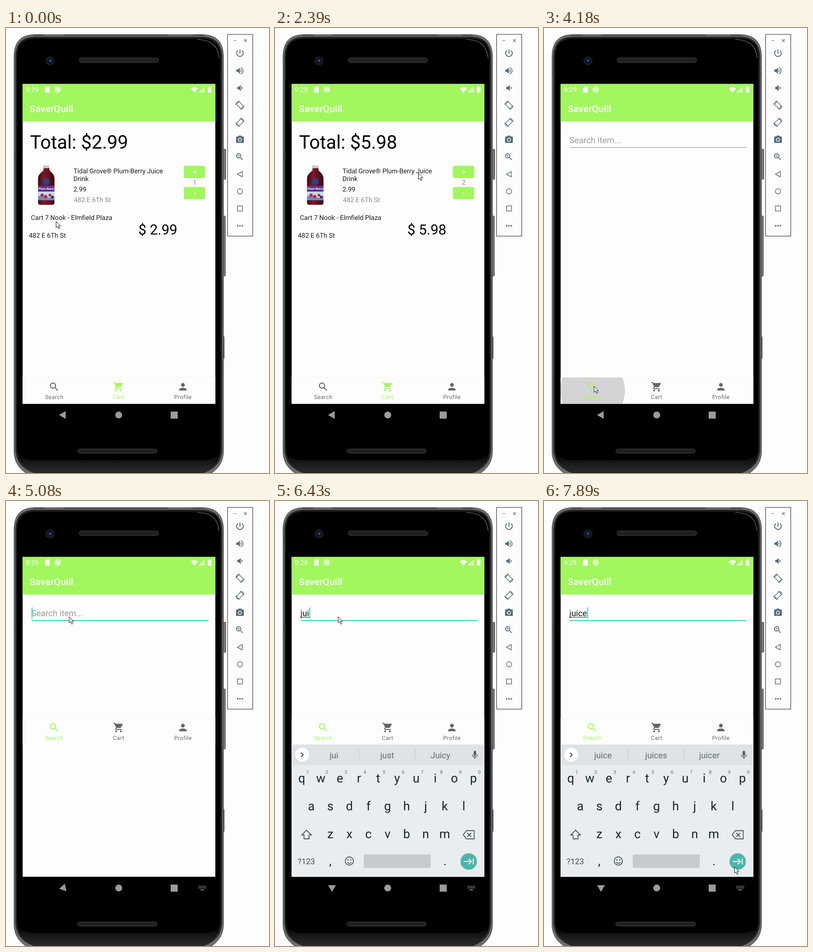
Animation of 575 by 974 pixels, one loop 8 s. Source, as an HTML page:

```html
<!DOCTYPE html>
<html lang="en">
<head>
<meta charset="utf-8">
<title>Cart and search demo</title>
<style>
html, body { margin: 0; width: 100%; height: 100%; overflow: hidden; background: #fdfdfd; }
svg { display: block; width: 575px; height: 974px; font-family: Roboto, "Open Sans", sans-serif; }
text { text-rendering: geometricPrecision; white-space: pre; }
.body { font-size: 14.4px; fill: #1b1b1b; }
.mid { text-anchor: middle; }
.btn { font-size: 14.4px; font-weight: 500; fill: #fff; text-anchor: middle; }
.nav { font-size: 12.3px; letter-spacing: .4px; text-anchor: middle; }
.tab { fill: #666; }
.tab.on { fill: #a2f75e; }
.key { font-size: 27px; fill: #14272e; text-anchor: middle; }
.sup { font-size: 10.5px; font-weight: 500; fill: #78838a; text-anchor: middle; }
.hint { font-size: 18.5px; fill: #5f6a70; text-anchor: middle; }
.line { fill: none; stroke: #546e7a; stroke-width: 1.7; }
</style>
</head>
<body>
<svg viewBox="0 0 575 974" xmlns="http://www.w3.org/2000/svg">
<defs>
  <linearGradient id="chin" x2="0" y2="1">
    <stop offset="0" stop-color="#000"/><stop offset="1" stop-color="#2b2c2e"/>
  </linearGradient>
  <linearGradient id="shade" x2="0" y2="1">
    <stop offset="0" stop-color="#cfe3c0"/><stop offset="1" stop-color="#fdfdfd"/>
  </linearGradient>
  <linearGradient id="juice">
    <stop offset="0" stop-color="#3c0a14"/><stop offset=".35" stop-color="#7c1a2c"/>
    <stop offset=".7" stop-color="#5c1020"/><stop offset="1" stop-color="#34080f"/>
  </linearGradient>
  <radialGradient id="lens">
    <stop offset="0" stop-color="#2c3a80"/><stop offset=".4" stop-color="#161d4a"/>
    <stop offset=".75" stop-color="#0a0c1c"/><stop offset="1" stop-color="#1c1e22"/>
  </radialGradient>
  <clipPath id="screen"><rect x="36.4" y="122.6" width="421.2" height="700"/></clipPath>
  <clipPath id="bar"><rect x="36" y="765" width="422" height="58"/></clipPath>
  <clipPath id="plus"><rect x="389" y="301.5" width="46.5" height="26.5" rx="3.5"/></clipPath>
  <path id="search" d="M15.5 14h-.79l-.28-.27C15.41 12.59 16 11.11 16 9.5 16 5.91 13.09 3 9.5 3S3 5.91 3 9.5 5.91 16 9.5 16c1.61 0 3.09-.59 4.23-1.57l.27.28v.79l5 4.99L20.49 19l-4.99-5zm-6 0C7.01 14 5 11.99 5 9.5S7.01 5 9.5 5 14 7.01 14 9.5 11.99 14 9.5 14z"/>
  <path id="cart" d="M7 18c-1.1 0-2 .9-2 2s.9 2 2 2 2-.9 2-2-.9-2-2-2zM1 2v2h2l3.6 7.59-1.35 2.45c-.16.28-.25.61-.25.96 0 1.1.9 2 2 2h12v-2H7.42c-.14 0-.25-.11-.25-.25l.03-.12.9-1.63h7.45c.75 0 1.41-.41 1.75-1.03l3.58-6.49c.08-.14.12-.31.12-.48 0-.55-.45-1-1-1H5.21l-.94-2H1zm16 16c-1.1 0-2 .9-2 2s.9 2 2 2 2-.9 2-2-.9-2-2-2z"/>
  <path id="person" d="M12 12c2.21 0 4-1.79 4-4s-1.79-4-4-4-4 1.79-4 4 1.79 4 4 4zm0 2c-2.67 0-8 1.34-8 4v2h16v-2c0-2.66-5.33-4-8-4z"/>
  <path id="mic" d="M12 14c1.66 0 3-1.34 3-3V5c0-1.66-1.34-3-3-3S9 3.34 9 5v6c0 1.66 1.34 3 3 3zm5.3-3c0 3-2.54 5.1-5.3 5.1S6.7 14 6.7 11H5c0 3.41 2.72 6.23 6 6.72V21h2v-3.28c3.28-.48 6-3.3 6-6.72h-1.7z"/>
  <path id="speaker" d="M3 9v6h4l5 5V4L7 9zM14 8v8c1.5-.7 2.5-2.2 2.5-4S15.5 8.7 14 8z"/>
  <g id="turn" class="line">
    <rect x="-8.5" y="-5" width="17" height="10" rx="1.5" transform="rotate(45)"/>
    <path d="M-1-11A11 11 0 0 0-11-1M1 11A11 11 0 0 0 11 1"/>
  </g>
</defs>

<rect width="575" height="974" fill="#fdfdfd"/>

<!-- phone -->
<g fill="#7d7e80" stroke="#2c2d2e">
  <rect x="473" y="265.500" width="7.500" height="65.500" rx="1.500"/>
  <rect x="473" y="411.500" width="6.500" height="131.500" rx="1.500"/>
  <rect x="472" y="675.500" width="5" height="48" rx="1"/>
</g>
<path d="M17.500 64C17.500 30 32 14.500 64 14.500H428C460 14.500 475.500 30 475.500 64V925C475.500 950 465 966 440 980H53C28 966 17.500 950 17.500 925Z" fill="#6b6c6e" stroke="#3c3d3f"/>
<path d="M60 15.500H84M126 15.500H354M408 15.500H432" stroke="#3a3b3d" stroke-width="2"/>
<path d="M20.500 66C20.500 34 34 19 66 19H426C458 19 472.500 34 472.500 66V918C472.500 948 460 963 432 974H61C33 963 20.500 948 20.500 918Z" fill="#232425"/>
<path d="M24 66C24 36 36 23 66 23H426C457 23 469 36 469 66V915C469 944 457 960 430 968H63C36 960 24 944 24 915Z" fill="#000"/>
<path d="M27 928Q34 946 62 946H431Q459 946 466 928Q462 960 430 972H63Q31 960 27 928Z" fill="url(#chin)"/>
<path d="M418 25C449 26 463 38 466 66" fill="none" stroke="#707274" stroke-width="1.600" opacity=".75"/>
<path d="M17 87.500H24M17 97.500H24M17 277.500H24M17 286.500H24M469 87.500H476M469 97.500H476" stroke="#3a3b3d"/>
<circle cx="96" cy="72" r="10" fill="#1a1b1e"/>
<circle cx="96" cy="72" r="7" fill="url(#lens)"/>
<circle cx="97" cy="71" r="1.200" fill="#8794d8"/>
<g fill="#1f2021" stroke="#434445">
  <rect x="160" y="65.500" width="173.500" height="10" rx="4.500"/>
  <rect x="157" y="921.500" width="173.500" height="9" rx="4.500"/>
</g>

<!-- screen -->
<g clip-path="url(#screen)">
  <rect x="36" y="122" width="422" height="701" fill="#fdfdfd"/>
  <rect x="36" y="204" width="422" height="2.500" fill="url(#shade)"/>
  <rect x="36" y="122" width="422" height="82.300" fill="#a2f75e"/>
  <g fill="#fff">
    <text x="43.500" y="140" font-size="14.400">9:29</text>
    <path d="M88.500 128H95.500V141.500H85.500V131.500Z"/>
    <path d="M404.500 132.500Q412 125.500 419.500 132.500L412 141.500Z"/>
    <path d="M434 128.500V141H421.500ZM432.500 132L426 139.500H430V136H432.500Z" fill-rule="evenodd"/>
    <path d="M443.500 127.500H446.500V129H449V141.500H441.500V129H443.500Z"/>
    <text x="52" y="183.500" font-size="20.500" font-weight="500" letter-spacing=".26">SaverQuill</text>
  </g>
  <g fill="none" stroke="#fff" stroke-width="1.500">
    <circle cx="113" cy="134.700" r="6"/><circle cx="113.500" cy="134.700" r="2.700"/>
    <path d="M108.500 131L117 139"/>
  </g>

  <g id="cartPage">
    <text id="total" x="52.500" y="264.400" font-size="41"></text>
    <g id="bottle">
      <path d="M82 305H95V311C98 316 106 319 106 330V382Q106 387 101 387H75Q70 387 70 382V330C70 319 79 316 82 311Z" fill="url(#juice)"/>
      <rect x="81" y="301" width="14" height="6" rx="1.500" fill="#c9c5cc"/>
      <circle cx="88" cy="336" r="7.500" fill="#2b4383"/>
      <rect x="70" y="345" width="36" height="13" fill="#5c318c"/>
      <rect x="70" y="358" width="36" height="18" fill="#c8d4ea"/>
      <path d="M70 369Q79 363 88 369T106 367V377H70Z" fill="#6d8cc4"/>
      <g fill="#b9283c"><circle cx="79" cy="366" r="3.500"/><circle cx="87" cy="369" r="3.500"/><circle cx="96" cy="366" r="3"/></g>
      <circle cx="101" cy="370" r="3" fill="#46285f"/>
      <text x="88" y="354" class="mid" font-size="6.600" font-weight="700" fill="#fff">Plum-Berry</text>
    </g>
    <g class="body">
      <text x="147.500" y="318">Tidal Grove® Plum-Berry Juice</text>
      <text x="147.500" y="334.500">Drink</text>
      <text x="147.500" y="357.500">2.99</text>
      <text x="148.500" y="381" fill="#8a8a8a">482 E 6Th St</text>
      <text x="54.500" y="420">Cart 7 Nook - Elmfield Plaza</text>
      <text x="50" y="458.500">482 E 6Th St</text>
    </g>
    <text id="sum" x="289.500" y="451.500" font-size="30.800"></text>
    <g fill="#d4e9c5">
      <rect x="389" y="302.500" width="46.500" height="26.500" rx="3.500"/>
      <rect x="389" y="349" width="46.500" height="26.500" rx="3.500"/>
    </g>
    <g fill="#a2f75e">
      <rect x="389" y="301.500" width="46.500" height="26.500" rx="3.500"/>
      <rect x="389" y="348" width="46.500" height="26.500" rx="3.500"/>
    </g>
    <circle id="press" cx="410" cy="318" r="20" fill="#fff" opacity=".35" clip-path="url(#plus)"/>
    <text x="412.500" y="320" class="btn">+</text>
    <text x="412.500" y="366" class="btn">-</text>
    <text id="count" x="412.500" y="342.500" class="mid" font-size="14.400" fill="#808080"></text>
  </g>

  <g id="searchPage">
    <text id="holder" x="55.500" y="252" font-size="18.500" fill="#9b9b9b">Search item...</text>
    <text id="typed" x="55.500" y="252" font-size="18.500" fill="#1b1b1b"></text>
    <rect id="compose" x="56" y="254" height="1" fill="#1b1b1b"/>
    <rect id="rule" x="56" width="387"/>
    <rect id="caret" y="233" width="1.800" height="24" fill="#1fd0c0"/>
  </g>

  <g id="tabs">
    <rect x="36" y="765" width="422" height="58" fill="#fdfdfd"/>
    <rect x="36" y="764" width="422" height="1" fill="#f6f6f6"/>
    <circle id="ripple" cx="106" cy="794" r="71" clip-path="url(#bar)"/>
  </g>

  <g id="board">
    <rect x="36" y="533" width="422" height="290" fill="#e9edf0"/>
    <rect x="36" y="533" width="422" height="45" fill="#dfe3e6"/>
    <circle cx="59.500" cy="556.500" r="15.700" fill="#c9cdd0"/>
    <circle cx="59.500" cy="555.700" r="15.500" fill="#fff"/>
    <path d="M57 551L61.500 555.500L57 560" fill="none" stroke="#37474f" stroke-width="2"/>
    <path d="M183.500 543.500V567M306.500 543.500V567" stroke="#c3c9cc"/>
    <use href="#mic" transform="translate(426 545) scale(.92)" fill="#4c5a61"/>
    <g id="keys"></g>
    <g fill="none" stroke="#46545b" stroke-width="1.800">
      <path d="M69 720.500L79.500 731H74.500V739.500H63.500V731H58.500Z"/>
      <path d="M418.500 721.500H435.500V739.500H418.500L411.500 730.500ZM420.500 726.500L429 735M429 726.500L420.500 735"/>
      <circle cx="162.500" cy="788" r="9"/><path d="M157.500 790.500Q162.500 796 167.500 790.500"/>
    </g>
    <g fill="#46545b"><circle cx="159.300" cy="785.500" r="1.400"/><circle cx="165.700" cy="785.500" r="1.400"/></g>
    <rect x="194" y="773.500" width="146.500" height="29.500" rx="2.500" fill="#c7cbce"/>
    <circle cx="423.500" cy="789" r="18" fill="#4cb5ab"/>
    <path d="M413 789H429M423.500 783L429.500 789L423.500 795M433.500 782.500V795.500" fill="none" stroke="#fff" stroke-width="2"/>
  </g>
</g>

<!-- system bar -->
<g fill="#9b9b9b">
  <path id="back" d="M116 847L130.500 838.500V855.500Z"/>
  <circle cx="246.500" cy="847" r="7.600"/>
  <rect x="360" y="839.500" width="15.500" height="15.500"/>
  <g id="kbIcon"></g>
</g>

<!-- emulator toolbar -->
<rect x="484.500" y="14" width="55" height="441.500" fill="#fdfdfd" stroke="#1a1a1a"/>
<path d="M497.500 27.500H503.500M520.500 24.500L526.500 30.500M526.500 24.500L520.500 30.500" class="line" style="stroke-width:1.200"/>
<path d="M511.500 47V56.500M507 49.200A7.300 7.300 0 1 0 516 49.200" class="line" style="stroke-width:2"/>
<g fill="#546e7a">
  <use href="#speaker" transform="translate(501 83) scale(.87)"/>
  <path d="M513.200 86.700A7 7 0 0 1 513.200 100.200" class="line"/>
  <use href="#speaker" transform="translate(503 121) scale(.86)"/>
  <path d="M509 235.500H514L515.800 237.500H518.500Q520 237.500 520 239V250Q520 251.500 518.500 251.500H504.500Q503 251.500 503 250V239Q503 237.500 504.500 237.500H507.200Z"/>
  <circle cx="511.500" cy="244.500" r="3.500" fill="none" stroke="#fdfdfd" stroke-width="1.500"/>
  <use href="#search" transform="translate(500.500 271.500) scale(.87)"/>
  <path d="M506 279.800H511.500M508.750 277V282.500" stroke="#546e7a"/>
  <circle cx="506.500" cy="433" r="1.800"/><circle cx="511.500" cy="433" r="1.800"/><circle cx="516.500" cy="433" r="1.800"/>
</g>
<use href="#turn" transform="translate(511.500 169) scale(-.82 .82) rotate(90)"/>
<use href="#turn" transform="translate(511.500 206.500) scale(.82) rotate(90)"/>
<g class="line" style="stroke-width:1.500">
  <path d="M506 320L516.500 314V326Z"/><circle cx="511.500" cy="357.500" r="5.700"/>
  <rect x="506" y="389.500" width="11" height="11"/>
</g>

<path id="cursor" d="M0 0V13.500L3.200 10.600L5.600 16L7.900 15L5.500 9.800H9.800Z" fill="#fff" stroke="#111" stroke-linejoin="round"/>
</svg>

<script>
const $ = id => document.getElementById(id);
const LOOP = 8000;
const ticks = [0, 150, 290, 430, 570, 710, 850, 990, 1700,
  1970, 2110, 2250, 2390, 2540, 2660, 2780, 2900,
  3340, 3480, 3620, 3760, 3910,
  4180, 4300, 4420, 4560, 4680, 4820, 4950, 5080, 5200, 5350, 5500,
  6030, 6230, 6430, 6580, 6730, 7260, 7390, 7520, 7650, 7780, 7890];

// pointer moves: start, end, target x, target y
const moves = [
  [10, 990, 409.5, 317.5], [1830, 2390, 313.5, 318], [2390, 2900, 195, 326.5],
  [3200, 3910, 109.5, 784], [4180, 4950, 138, 253.5], [7130, 7890, 416.5, 801]];
const ease = p => .5 * p + .5 * p * p * (3 - 2 * p);

function pointer(t) {
  let x = 109.5, y = 423.5;
  for (const [a, b, tx, ty] of moves) {
    if (t <= a) break;
    const p = ease(Math.min(1, (t - a) / (b - a)));
    x += (tx - x) * p;
    y += (ty - y) * p;
  }
  return [x, y];
}

// latest value whose start time has passed
const pick = (t, steps) => steps.reduce((v, [at, val]) => t >= at ? val : v, steps[0][1]);

const words = [[0, ""], [6030, "j"], [6230, "ju"], [6430, "jui"], [6580, "juic"], [6730, "juice"]];
const hints = {
  "": ["the", "I", "I'm"], j: ["j", "just", "June"], ju: ["ju", "just", "July"],
  jui: ["jui", "just", "Juicy"], juic: ["juic", "juice", "juicy"], juice: ["juice", "juices", "juicer"]
};
const fades = [[0, 0], [4180, .16], [4300, .1], [4420, .04], [4560, 0]];
const slides = [[0, 290], [5200, 190], [5350, 35], [5500, 0]];
const turns = [[0, 0], [5080, -12], [5200, -50], [5350, -82], [5500, -90]];

const label = (cls, x, y, s, more = "") => `<text class="${cls}" x="${x}" y="${y}" ${more}>${s}</text>`;

const tabNames = ["Search", "Cart", "Profile"], tabIcons = ["search", "cart", "person"];
$("tabs").insertAdjacentHTML("beforeend", tabNames.map((s, i) => {
  const x = 105.3 + i * 140.7;
  return `<g class="tab"><use href="#${tabIcons[i]}" transform="translate(${x - 12.3} 773) scale(1.027)"/>` +
    label("nav", x + .2, 812, s) + "</g>";
}).join(""));
const tabs = document.querySelectorAll(".tab");

const rows = [["qwertyuiop", 58.5, 616], ["asdfghjkl", 79.3, 677], ["zxcvbnm", 121, 738]];
let keys = "";
for (const [chars, x, y] of rows)
  [...chars].forEach((c, i) => keys += label("key", x + i * 41.7, y, c));
for (let i = 0; i < 10; i++) keys += label("sup", 71.5 + i * 41.7, 597, (i + 1) % 10);
keys += label("hint", 68.5, 794.5, "?123", 'style="font-size:17.5px;fill:#3f4d54"');
keys += label("key", 121, 797, ",") + label("key", 371.5, 797, ".");
for (let i = 0; i < 3; i++) keys += label("hint word", 129 + i * 116.3, 563, "");
$("keys").innerHTML = keys;
const hintText = document.querySelectorAll(".word");

let dots = '<rect x="425" y="850" width="8" height="1.8"/>';
for (let i = 0; i < 12; i++)
  dots += `<rect x="${421 + i % 6 * 2.9}" y="${842.5 + (i > 5) * 3.4}" width="1.8" height="1.8"/>`;
$("kbIcon").innerHTML = dots;

const show = (id, on) => $(id).style.display = on ? "" : "none";
const set = (id, name, val) => $(id).setAttribute(name, val);

function draw(t) {
  const searching = t >= 4180, focus = t >= 4950, raised = t >= 5080;
  const n = t >= 1970 ? 2 : 1, price = (n * 2.99).toFixed(2);
  show("cartPage", !searching);
  show("searchPage", searching);
  $("total").textContent = "Total: $" + price;
  $("sum").textContent = "$ " + price;
  $("count").textContent = n;
  show("press", t >= 1700 && t < 1970);

  tabs.forEach((el, i) => el.classList.toggle("on", i === (searching ? 0 : 1)));
  set("tabs", "transform", `translate(0 ${raised ? -289.5 : 0})`);
  set("ripple", "opacity", pick(t, fades));

  const word = pick(t, words);
  $("typed").textContent = word;
  const w = word && searching ? $("typed").getComputedTextLength() : 0;
  show("holder", !word);
  set("compose", "width", w);
  set("rule", "y", focus ? 260.7 : 261);
  set("rule", "height", focus ? 2 : 1);
  set("rule", "fill", focus ? "#2ad2c3" : "#858585");
  set("caret", "x", 56 + w);
  show("caret", focus && !(t >= 7260 && t < 7780));

  show("board", t >= 5200);
  set("board", "transform", `translate(0 ${pick(t, slides)})`);
  hints[word].forEach((s, i) => hintText[i].textContent = s);
  show("kbIcon", raised);
  set("back", "transform", `rotate(${pick(t, turns)} 124.5 847)`);
  set("cursor", "transform", `translate(${pointer(t).join(" ")})`);
}

let last = -1;
function frame() {
  const now = performance.now() % LOOP;
  const t = ticks.reduce((v, k) => k <= now ? k : v, 0);
  if (t !== last) draw(last = t);
  requestAnimationFrame(frame);
}
frame();
</script>
</body>
</html>
```
